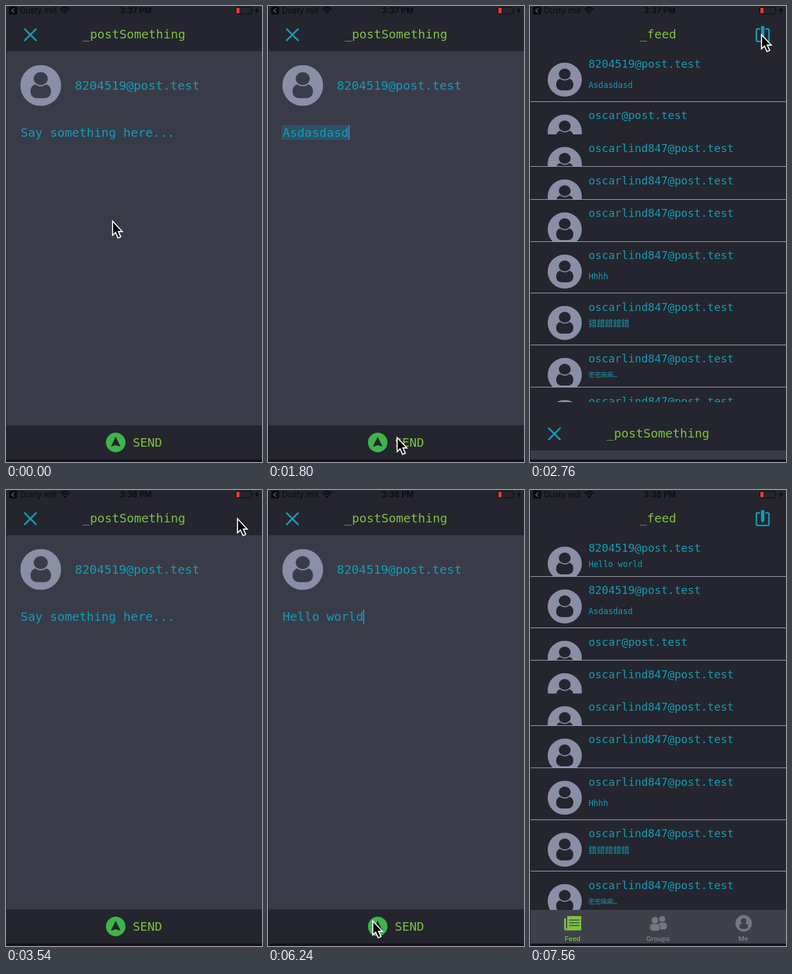
An HTML page for the animation above (7.62 s loop, 420x746 px).

```html
<!DOCTYPE html>
<html lang="en">
<head>
<meta charset="utf-8">
<title>Post to feed</title>
<style>
:root {
  --dark: #24252e; --panel: #3a3b48; --teal: #129db5; --green: #7fc241;
  --avatar: #8a8fa6; --ink: #0b0b10; --loop: 7620ms;
}
html, body { margin: 0; width: 100%; height: 100%; overflow: hidden; background: var(--dark); }
#stage {
  position: relative; width: 420px; height: 746px; overflow: hidden; background: var(--dark);
  font: 20px/24px "DejaVu Sans Mono", "Noto Sans CJK TC", "Noto Sans CJK", monospace; color: var(--teal);
}
#stage div, #stage svg { position: absolute; }
svg { left: 0; top: 0; overflow: visible; }
.text { white-space: pre; margin-top: -12px; }
.mid { width: 420px; text-align: center; }
.title { color: var(--green); top: 46px; }

/* Feed */
.list { top: 72.4px; width: 420px; height: 614.6px; overflow: hidden; visibility: hidden; }
.row { width: 420px; overflow: hidden; }
.row.line::after {
  content: ""; position: absolute; left: 0; bottom: 0; width: 100%; height: 1px; background: #a9aab2;
}
.row .text { left: 96px; }
.mail { top: 22.6px; font-size: 18px; }
.note { top: 50px; font-size: 13.4px; }
.note.low { top: 57.5px; }
.note.small { top: 49.5px; font-size: 10.2px; }
#tabs { top: 687px; width: 420px; height: 55px; background: #3f404a; }
#tabs .text { top: 47px; width: 80px; text-align: center; font: 500 11px/24px Inter, sans-serif; color: #85868d; }
#tabs .text.on { color: var(--green); }

/* Post screen */
#post { width: 420px; height: 742px; background: var(--panel); animation: slide var(--loop) infinite; }
#post .bar { width: 420px; background: var(--dark); }
.field { left: 22px; top: 195px; height: 24px; padding-left: 2px; white-space: pre; overflow: hidden; }
.typed { border-right: 2px solid #3c78e0; }
#hint { animation: hint var(--loop) step-end infinite; }
#first { animation: showFirst var(--loop) step-end infinite, typeFirst var(--loop) infinite; }
#second { animation: showSecond var(--loop) step-end infinite, typeSecond var(--loop) infinite; }

/* Status bar */
.status { top: 7px; font: 13px/24px Inter, sans-serif; color: var(--ink); }
.clock { font-weight: 600; left: 3px; }
#early { animation: early var(--loop) step-end infinite; }
#late { animation: late var(--loop) step-end infinite; }
#edge { width: 1px; height: 746px; background: #1b1b23; }
#strip { top: 742px; width: 420px; height: 4px; background: #15111c; }
#cursor { animation: point var(--loop) infinite ease-in-out; }

#list0 { animation: list0 var(--loop) step-end infinite; }
#list1 { animation: list1 var(--loop) step-end infinite; }
#list2 { animation: list2 var(--loop) step-end infinite; }

@keyframes slide {
  0% { transform: none; }
  26.466% { transform: none; animation-timing-function: cubic-bezier(.2, .8, .2, 1); }
  31.716% { transform: translateY(747px); }
  36.07% { transform: translateY(747px); animation-timing-function: cubic-bezier(.2, .8, .2, 1); }
  41.32% { transform: none; }
  83.99% { transform: none; animation-timing-function: cubic-bezier(.2, .8, .2, 1); }
  89.24%, 100% { transform: translateY(747px); }
}
@keyframes list0 { 0% { visibility: visible; } 32.28%, 100% { visibility: hidden; } }
@keyframes list1 { 0% { visibility: hidden; } 32.28% { visibility: visible; } 90.03%, 100% { visibility: hidden; } }
@keyframes list2 { 0% { visibility: hidden; } 90.03%, 100% { visibility: visible; } }
@keyframes hint {
  0% { visibility: visible; } 5.906% { visibility: hidden; }
  34.121% { visibility: visible; } 56.43%, 100% { visibility: hidden; }
}
@keyframes showFirst {
  0% { visibility: hidden; background: none; }
  5.906% { visibility: visible; background: none; }
  19.685% { visibility: visible; background: #2d5264; }
  34.121%, 100% { visibility: hidden; background: none; }
}
@keyframes typeFirst {
  0%, 7.087% { width: 0; animation-timing-function: steps(9); }
  15.945%, 100% { width: 9ch; }
}
@keyframes showSecond { 0% { visibility: hidden; } 56.43%, 100% { visibility: visible; } }
@keyframes typeSecond {
  0%, 59.055% { width: 0; animation-timing-function: steps(11); }
  74.803%, 100% { width: 11ch; }
}
@keyframes early { 0% { visibility: visible; } 43.3%, 100% { visibility: hidden; } }
@keyframes late { 0% { visibility: hidden; } 43.3%, 100% { visibility: visible; } }
@keyframes point {
  0% { transform: translate(174px, 351px); }
  5.3%, 8.5% { transform: translate(142px, 208px); }
  13%, 17.1% { transform: translate(159px, 292px); }
  23%, 28.9% { transform: translate(211px, 705px); }
  34.7%, 47.3% { transform: translate(379px, 46px); }
  54%, 58.5% { transform: translate(160px, 204px); }
  63%, 73.5% { transform: translate(162px, 292px); }
  79.5%, 85.5% { transform: translate(171px, 704px); }
  91%, 100% { transform: translate(171px, 760px); }
}
</style>
</head>
<body>
<div id="stage">
  <svg width="0" height="0">
    <symbol id="person" viewBox="-33 -33 66 66">
      <circle r="33" fill="var(--avatar)"/>
      <rect x="-16.5" y="-2" width="33" height="22.500" rx="10" fill="currentColor"/>
      <ellipse cy="-11" rx="12.4" ry="11.4" fill="currentColor" stroke="var(--avatar)" stroke-width="2"/>
    </symbol>
  </svg>

  <div id="feed">
    <div class="text mid title">_feed</div>
    <svg width="420" height="74" fill="none" stroke="var(--teal)" stroke-width="2.6">
      <path d="M376.500 37.500h-3q-2 0-2 2V56q0 2 2 2h16.500q2 0 2-2V39.500q0-2-2-2h-3" stroke-linecap="round"/>
      <path d="M379 33h5.500v17l-2.750 4-2.750-4z" fill="var(--teal)" stroke="none"/>
    </svg>
    <div class="list" id="list0"></div>
    <div class="list" id="list1"></div>
    <div class="list" id="list2"></div>
    <div id="tabs">
      <svg width="420" height="55">
        <path d="M61 10h23v23.500H59q-3 0-3-3V14h3v15q0 1.500 1 1.500t1-1.500z" fill="var(--green)"/>
        <path d="M64 16.500h17M64 21h17M64 25.500h17" stroke="#3f404a" stroke-width="1.600"/>
        <g fill="#77787f" stroke="#3f404a">
          <circle cx="217" cy="15" r="5.500"/><rect x="209" y="20.500" width="16" height="12" rx="5"/>
          <circle cx="205" cy="17" r="6"/><rect x="196.500" y="22.500" width="17" height="12" rx="5"/>
        </g>
        <circle cx="350.500" cy="22" r="13.500" fill="#77787f"/>
        <circle cx="350.500" cy="18" r="4.600" fill="#3f404a"/>
        <rect x="343.500" y="22.500" width="14" height="8.500" rx="4" fill="#3f404a"/>
      </svg>
      <div class="text on" style="left:30px">Feed</div>
      <div class="text" style="left:170px">Groups</div>
      <div class="text" style="left:310px">Me</div>
    </div>
  </div>

  <div id="post">
    <div class="bar" style="top:-5px;height:79px"></div>
    <div class="bar" style="top:686px;height:56px"></div>
    <div class="text mid title">_postSomething</div>
    <svg width="420" height="742">
      <path d="M30 37l20 20M50 37l-20 20" stroke="var(--teal)" stroke-width="2.800"/>
      <use href="#person" x="23.500" y="96.500" width="67" height="67" color="#3a3b48"/>
      <circle cx="180" cy="714" r="16" fill="#3fb44b"/>
      <path d="M180 704.500l8 16.500-8-2.500-8 2.500z" fill="var(--dark)"/>
    </svg>
    <div class="text" style="left:113px;top:130px">8204519@post.test</div>
    <div class="field" id="hint">Say something here...</div>
    <div class="field typed" id="first">Asdasdasd</div>
    <div class="field typed" id="second">Hello world</div>
    <div class="text" style="left:208px;top:714px;color:var(--green)">SEND</div>
  </div>

  <svg width="420" height="16">
    <rect x="5" y="1" width="13.500" height="13" rx="3" fill="var(--ink)"/>
    <path d="M13.500 4l-4 3.500 4 3.500" fill="none" stroke="#62636c" stroke-width="1.500"/>
    <path d="M89.500 5.500q7.200-6.500 14.400 0M92 8.500q4.700-4.300 9.400 0" fill="none" stroke="var(--ink)" stroke-width="2.300"/>
    <path d="M94 10.500q2.700-2.200 5.400 0l-2.700 2.800z" fill="var(--ink)"/>
    <rect x="377" y="2" width="25.500" height="11" rx="2.500" fill="none" stroke="var(--ink)"/>
    <path d="M404 5.500q2 2 0 4z" fill="var(--ink)"/>
    <rect x="378" y="3" width="5" height="9" rx="1" fill="#f0392f"/>
    <path d="M413 2l-5 6h3l-1 5 5-6.500h-3z" fill="var(--ink)"/>
  </svg>
  <div class="text status" style="left:23px">Dusty mill</div>
  <div class="text status mid clock" id="early">3:37 PM</div>
  <div class="text status mid clock" id="late">3:38 PM</div>

  <svg id="cursor" width="20" height="30">
    <path d="M.8 1v23l5-4.500 4 9 4.500-2-4-8.500h6.500z" fill="#000" stroke="#fff" stroke-width="1.800"/>
  </svg>
  <div id="edge"></div>
  <div id="strip"></div>
</div>

<script>
const me = '8204519@post.test', short = 'oscar@post.test', long = 'oscarlind847@post.test';
const S = 53.25, M = 69.25, L = 84.5; // row heights

// Each row: height, sender, note, note style; the row at index `bare` has no line
const lists = [
  { bare: 1, rows: [
    [L, short, 'Jjjj'], [S, long], [S, long], [S, long], [M, long, 'Hhhh'],
    [L, long, '錯錯錯錯錯'], [L, long, '密密麻麻'], [M, long], [L, long]] },
  { bare: 1, rows: [
    [L, me, 'Asdasdasd', 'low'], [S, short], [S, long], [S, long], [M, long],
    [L, long, 'Hhhh', 'low'], [L, long, '錯錯錯錯錯'], [M, long, '密密麻麻…', 'small'], [L, long]] },
  { bare: 3, rows: [
    [M, me, 'Hello world'], [L, me, 'Asdasdasd', 'low'], [S, short], [S, long], [S, long],
    [M, long], [L, long, 'Hhhh', 'low'], [L, long, '錯錯錯錯錯'], [M, long, '密密麻麻…', 'small']] }
];

function rowHtml([height, mail, note = '', style = ''], top, line) {
  return `<div class="row ${line ? 'line' : ''}" style="top:${top}px;height:${height}px">
    <svg width="90" height="80"><use href="#person" x="29" y="20.5" width="56" height="56" color="#24252e"/></svg>
    <div class="text mail">${mail}</div>
    <div class="text note ${style}">${note}</div></div>`;
}

lists.forEach(({ bare, rows }, n) => {
  let top = 0;
  document.getElementById('list' + n).innerHTML = rows.map((row, i) => {
    const html = rowHtml(row, top, i !== bare);
    top += row[0];
    return html;
  }).join('');
});
</script>
</body>
</html>
```
